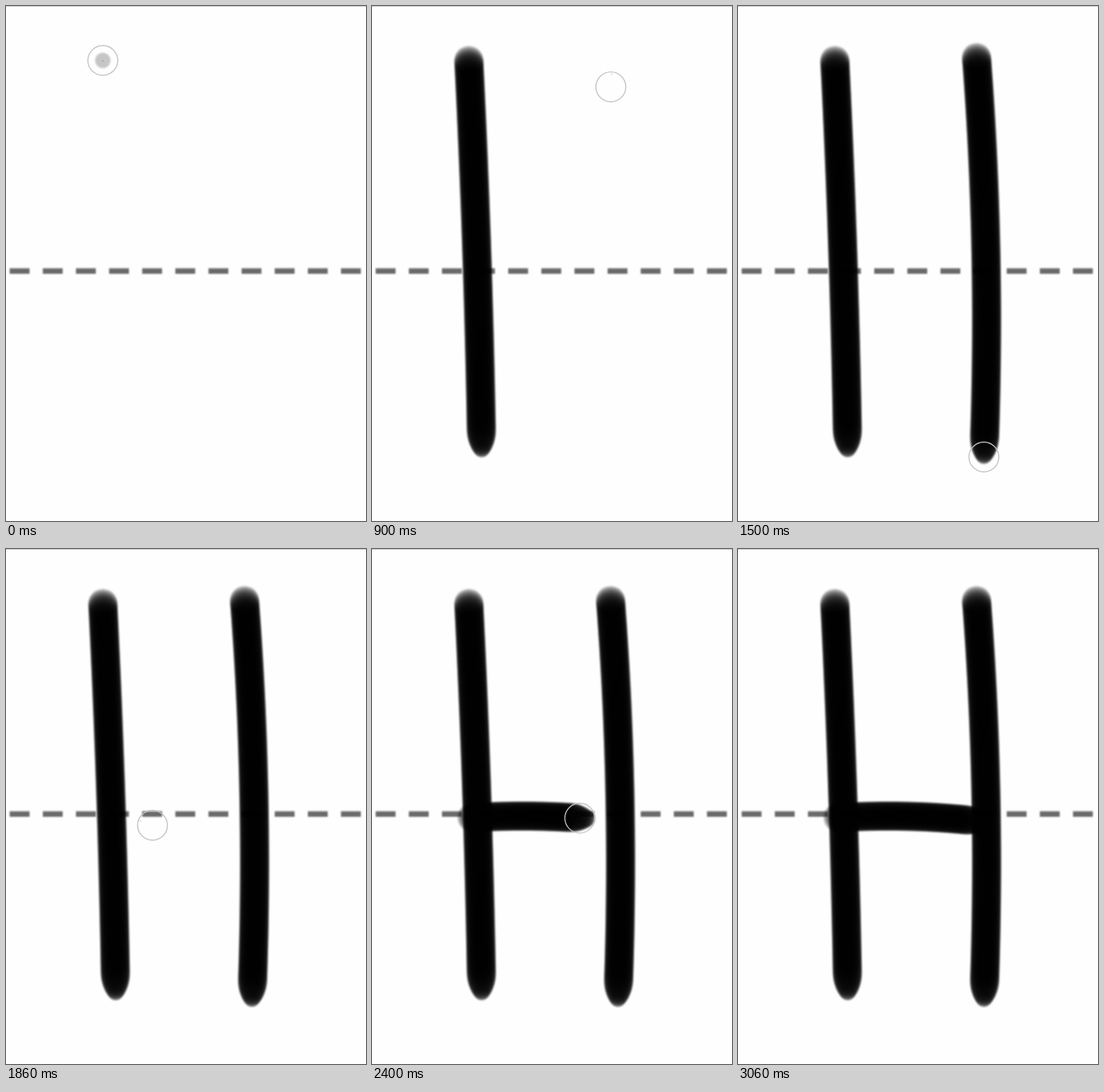
An HTML page with a canvas for the animation above (8640 ms loop, 489 px wide and 700 px high).

```html
<!DOCTYPE html>
<html lang="en">
<head>
<meta charset="utf-8">
<title>Writing the letter H</title>
<style>
  html, body { margin: 0; width: 100%; height: 100%; overflow: hidden; background: #fefefe; }
  canvas { display: block; }
</style>
</head>
<body>
<canvas id="stage" width="489" height="700"></canvas>
<script>
const W = 489, H = 700, LOOP = 8640, EXIT = 3060;
const BRUSH = 20, FLOW = 0.22, SPACING = 2;
const TAPER = 14;  // stamps over which the brush narrows towards its head
const LEAD = 30;   // ms by which the hot spot runs ahead of the ring

const ctx = document.getElementById('stage').getContext('2d');
const layer = document.createElement('canvas');
layer.width = W;
layer.height = H;
const ink = layer.getContext('2d');

// Each move is a quadratic curve that starts where the one before it ended
const moves = [
  { start: 30, end: 420, via: [144.6, 335], to: [149, 604], inked: true },
  { start: 480, end: 980, via: [342, 170], to: [324, 70] },
  { start: 990, end: 1500, via: [344.7, 340], to: [334, 613], inked: true },
  { start: 1520, end: 1970, via: [276, 354], to: [136, 365] },
  { start: 2010, end: 2580, via: [240, 359], to: [335, 371], inked: true },
  { start: 2580, end: EXIT, via: [560, 130], to: [540, 220] }
];
let last = [131.5, 74];
for (const m of moves) {
  m.from = last;
  last = m.to;
}

function pointOn(m, u) {
  const v = 1 - u;
  return [0, 1].map(k =>
    v * v * m.from[k] + 2 * v * u * m.via[k] + u * u * m.to[k]);
}

// Strokes start and stop gently, travel is steady
function progress(m, t) {
  const u = Math.max(0, Math.min(1, (t - m.start) / (m.end - m.start)));
  return m.inked ? (u + u * u * (3 - 2 * u)) / 2 : u;
}

function penAt(t) {
  const m = moves.findLast(m => t >= m.start) || moves[0];
  return pointOn(m, progress(m, t));
}

function disc(c, [x, y], r) {
  c.beginPath();
  c.arc(x, y, r, 0, 2 * Math.PI);
}

function drawPaper() {
  ctx.fillStyle = '#fefefe';
  ctx.fillRect(0, 0, W, H);
  ctx.fillStyle = '#cacaca';
  ctx.fillRect(0, 0, W, 1);
  ctx.filter = 'blur(1.1px)';
  ctx.fillStyle = '#6a6a6a';
  ctx.beginPath();
  for (let x = 5; x < W; x += 45) ctx.rect(x, 356.5, 27, 7.5);
  ctx.fill();
  ctx.filter = 'none';
}

function drawStroke(m, t) {
  const length = Math.hypot(m.to[0] - m.from[0], m.to[1] - m.from[1]);
  const count = Math.round(length / SPACING);
  const head = progress(m, t) * count;
  for (let i = 0; i <= head; i++) {
    const near = Math.max(0, 1 - (head - i) / TAPER);
    disc(ink, pointOn(m, i / count), BRUSH * (1 - near * near / 2));
    ink.fill();
  }
}

function drawInk(t) {
  ink.clearRect(0, 0, W, H);
  ink.fillStyle = `rgba(0,0,0,${FLOW})`;
  for (const m of moves) {
    if (m.inked && t > m.start) drawStroke(m, t);
  }
  ctx.filter = 'blur(0.8px)';
  ctx.drawImage(layer, 0, 0);
  ctx.filter = 'none';
}

function draw(t) {
  const visible = t < EXIT;
  drawPaper();
  if (visible) {
    ctx.fillStyle = '#cccccc';
    disc(ctx, penAt(t + LEAD), 1);
    ctx.fill();
  }
  drawInk(t + LEAD);
  if (visible) {
    ctx.strokeStyle = '#c2c2c2';
    ctx.lineWidth = 1.4;
    disc(ctx, penAt(t), 20.3);
    ctx.stroke();
  }
}

const origin = performance.now();
function tick() {
  draw((performance.now() - origin) % LOOP);
  requestAnimationFrame(tick);
}
tick();
</script>
</body>
</html>
```
